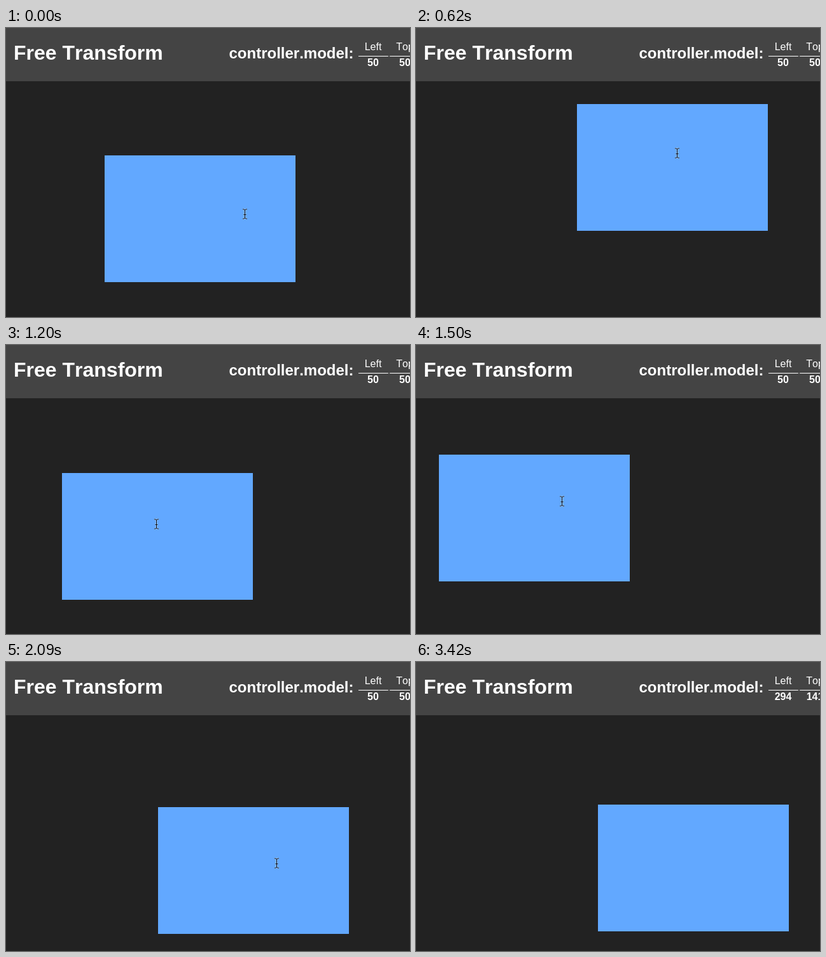
Recreate the animation shown at these times as an HTML page with a canvas. Size 635 by 456 pixels, loop 3.88 s.

```html
<!DOCTYPE html>
<html lang="en">
<head>
<meta charset="utf-8">
<title>Free Transform</title>
<style>
  html, body { margin: 0; width: 100%; height: 100%; overflow: hidden; background: #222; }
  canvas { display: block; }
</style>
</head>
<body>
<canvas width="635" height="456"></canvas>
<script>
const ctx = document.querySelector('canvas').getContext('2d');
const LOOP = 3880;
const STEP = 148;              // the screen refreshes once per step
const DROP = 16, GONE = 23;    // steps at which the box is released and the pointer is gone
const GRIP = [171, 83];        // pointer position inside the box
const LEAD = 0.55;             // steps by which the box trails the pointer

// Key points of both movements: step, x, y
const dragPath = [
  [0, 155, 201], [1, 235, 212], [3, 276, 167], [4, 253, 120], [6, 199, 119], [7, 159, 163],
  [8, 88, 202], [10, 36, 173], [12, 159, 147], [14, 239, 229], [DROP, 286, 225],
];
const leavePath = [[17, 449.5, 311], [18, 508, 402], [20, 573, 446], [22, 586, 454]];

const beamPath = new Path2D(
  'M-3.5-7.5H-2Q0-7.5 0-5.5Q0-7.5 2-7.5H3.5M0-6V6M-3.5 7.5H-2Q0 7.5 0 5.5Q0 7.5 2 7.5H3.5M-2 1H2');
const arrowPath = new Path2D('M1 1.5V14.2L4 11.4L6.2 16.6L8.3 15.7L6.1 10.6H10.3Z');

// The refresh is late once, just before 620 ms
const stepAt = t => t < 620
  ? Math.min(3, Math.floor((t + 8) / STEP))
  : Math.floor((t - 16) / STEP);

// Smooth curve through the key points
function along(path, step) {
  const last = path.length - 1;
  const s = Math.min(step, path[last][0]);
  const i = Math.min(last - 1, path.findLastIndex(([start]) => start <= s));
  const [a, b] = [path[i], path[i + 1]];
  const before = path[i - 1] ?? a, after = path[i + 2] ?? b;
  const span = b[0] - a[0], u = (s - a[0]) / span;
  return [1, 2].map(axis => {
    const slopeA = (b[axis] - before[axis]) / (b[0] - before[0]);
    const slopeB = (after[axis] - a[axis]) / (after[0] - a[0]);
    const ease = u * u * (3 - 2 * u);
    return a[axis] + (b[axis] - a[axis]) * ease
      + span * u * (1 - u) * (slopeA * (1 - u) - slopeB * u);
  });
}

function rect(color, x, y, w, h) {
  ctx.fillStyle = color;
  ctx.fillRect(x, y, w, h);
}

function text(string, x, y, size, weight = 'bold', align = 'left') {
  ctx.font = `${weight} ${size}px "Liberation Sans", Arial, sans-serif`;
  ctx.fontKerning = 'none';
  ctx.textAlign = align;
  ctx.fillStyle = '#fff';
  ctx.fillText(string, x, y);
}

function column(label, value, left, center) {
  text(label, center, 35, 16, 'normal', 'center');
  rect('#fff', left, 44, 47, 1);
  text(value, center, 60, 16, 'bold', 'center');
}

function stroke(path, color, width) {
  ctx.strokeStyle = color;
  ctx.lineWidth = width;
  ctx.stroke(path);
}

function drawBeam() {
  stroke(beamPath, 'rgba(255, 255, 255, 0.35)', 2.4);
  stroke(beamPath, '#0a0d14', 1);
}

function drawArrow() {
  ctx.lineJoin = 'round';
  ctx.shadowColor = 'rgba(0, 0, 0, 0.35)';
  ctx.shadowBlur = 2;
  ctx.shadowOffsetY = 1;
  stroke(arrowPath, '#fff', 2);
  ctx.shadowColor = 'transparent';
  ctx.fillStyle = '#000';
  ctx.fill(arrowPath);
}

function drawAt([x, y], shape) {
  ctx.save();
  ctx.translate(x, y);
  shape();
  ctx.restore();
}

function draw(t) {
  const step = stepAt(t);
  const dropped = step >= DROP;
  const [left, top] = along(dragPath, step).map(Math.round);

  rect('#222', 0, 0, 635, 456);
  rect('#444', 0, 0, 635, 84);
  text('Free Transform', 12, 50, 32);
  text('controller.model:', 350.5, 48, 24);
  column('Left', dropped ? 294 : 50, 554, 577);
  column('Top', dropped ? 141 : 50, 603, 627);
  rect('#62a8ff', left, top, 300, 200);

  if (step <= DROP) {
    const held = along(dragPath, step + LEAD);
    drawAt(held.map((v, axis) => Math.round(v + GRIP[axis]) + 0.5), drawBeam);
  } else if (step < GONE) {
    drawAt(along(leavePath, step), drawArrow);
  }
}

function frame() {
  draw(performance.now() % LOOP);
  requestAnimationFrame(frame);
}
frame();
</script>
</body>
</html>
```
